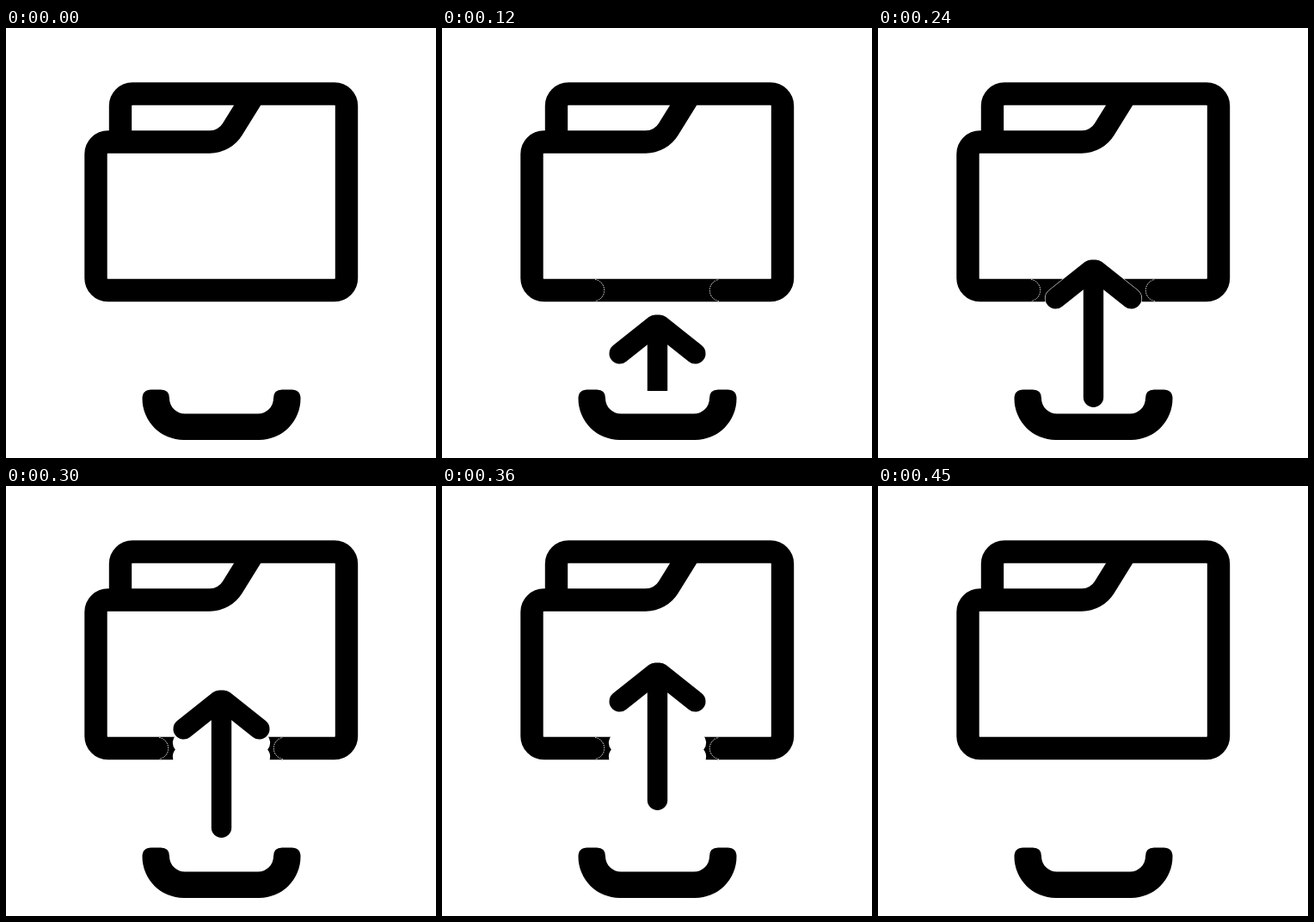
Recreate the animation shown at these times as an HTML page with a canvas. Size 500x500 px, loop 0.9 s.

```html
<!DOCTYPE html>
<html lang="en">
<head>
<meta charset="utf-8">
<title>Folder upload</title>
<style>
  html, body { margin: 0; width: 100%; height: 100%; overflow: hidden; background: #fff; }
  canvas { display: block; width: 500px; height: 500px; }
</style>
</head>
<body>
<canvas id="stage" width="500" height="500"></canvas>
<script>
const ctx = document.getElementById('stage').getContext('2d');
const LOOP = 900, STEP = 30, LAST_STEP = 15;

const folder = new Path2D();
folder.moveTo(133, 132.5);
folder.arcTo(133, 76.5, 250, 76.5, 14);
folder.arcTo(396, 76.5, 396, 200, 14);
folder.arcTo(396, 305, 250, 305, 14);
folder.arcTo(104.5, 305, 104.5, 200, 14);
folder.arcTo(104.5, 132.5, 200, 132.5, 14);
folder.arcTo(254.2, 132.5, 286.7, 80, 31);
folder.lineTo(286.7, 80);

const tray = new Path2D(`M158.5 431 Q158.5 420.5 169 420.5 H180 Q190 420.5 190 430.5
  A18 18 0 0 0 208 448.5 H293 A18 18 0 0 0 311 430.5 Q311 420.5 321 420.5 H332
  Q342.5 420.5 342.5 431 A48 48 0 0 1 294.5 479 H206.5 A48 48 0 0 1 158.5 431 Z`);

const shaft = new Path2D('M250.5 14 V159.8');
const head = new Path2D('M206.5 45 L248 12 M294.5 45 L253 12');

const tipAt = step => 397.5 - 16 * step;

function drawArrow(step, color, grow = 0) {
  ctx.save();
  ctx.translate(0, tipAt(step));
  ctx.strokeStyle = color;
  ctx.lineCap = 'round';
  ctx.lineWidth = 23.4 + grow;
  ctx.stroke(shaft);
  ctx.lineWidth = 24 + grow;
  ctx.stroke(head);
  ctx.restore();
}

function clipTo(x, y, w, h, draw) {
  ctx.save();
  ctx.beginPath();
  ctx.rect(x, y, w, h);
  ctx.clip();
  draw();
  ctx.restore();
}

function drawSeam(x, from, to) {
  ctx.beginPath();
  ctx.arc(x, 305, 12.7, from, to);
  ctx.stroke();
}

function drawSeams() {
  ctx.save();
  ctx.strokeStyle = '#fff';
  ctx.lineWidth = 1;
  ctx.setLineDash([1.5, 1.2]);
  drawSeam(176, -1.4, 1.4);
  drawSeam(324, Math.PI - 1.4, Math.PI + 1.4);
  ctx.restore();
}

function draw(step) {
  ctx.fillStyle = '#fff';
  ctx.fillRect(0, 0, 500, 500);
  ctx.strokeStyle = ctx.fillStyle = '#000';
  ctx.lineWidth = 26.4;
  ctx.stroke(folder);
  ctx.fill(tray);
  if (step === 0 || step >= LAST_STEP) return;

  // Every earlier position of the arrow stays cut out of the lower bar.
  clipTo(189, 290, 122, 30, () => {
    for (let i = 1; i <= step; i++) drawArrow(i, '#fff', 1.2);
  });
  drawSeams();
  clipTo(0, 0, 500, 392 + 7.5 * step, () => drawArrow(step, '#000'));
}

const start = performance.now();
function tick(now) {
  const time = Math.max(0, now - start) % LOOP;
  draw(Math.min(LAST_STEP, Math.floor(time / STEP)));
  requestAnimationFrame(tick);
}
draw(0);
requestAnimationFrame(tick);
</script>
</body>
</html>
```
